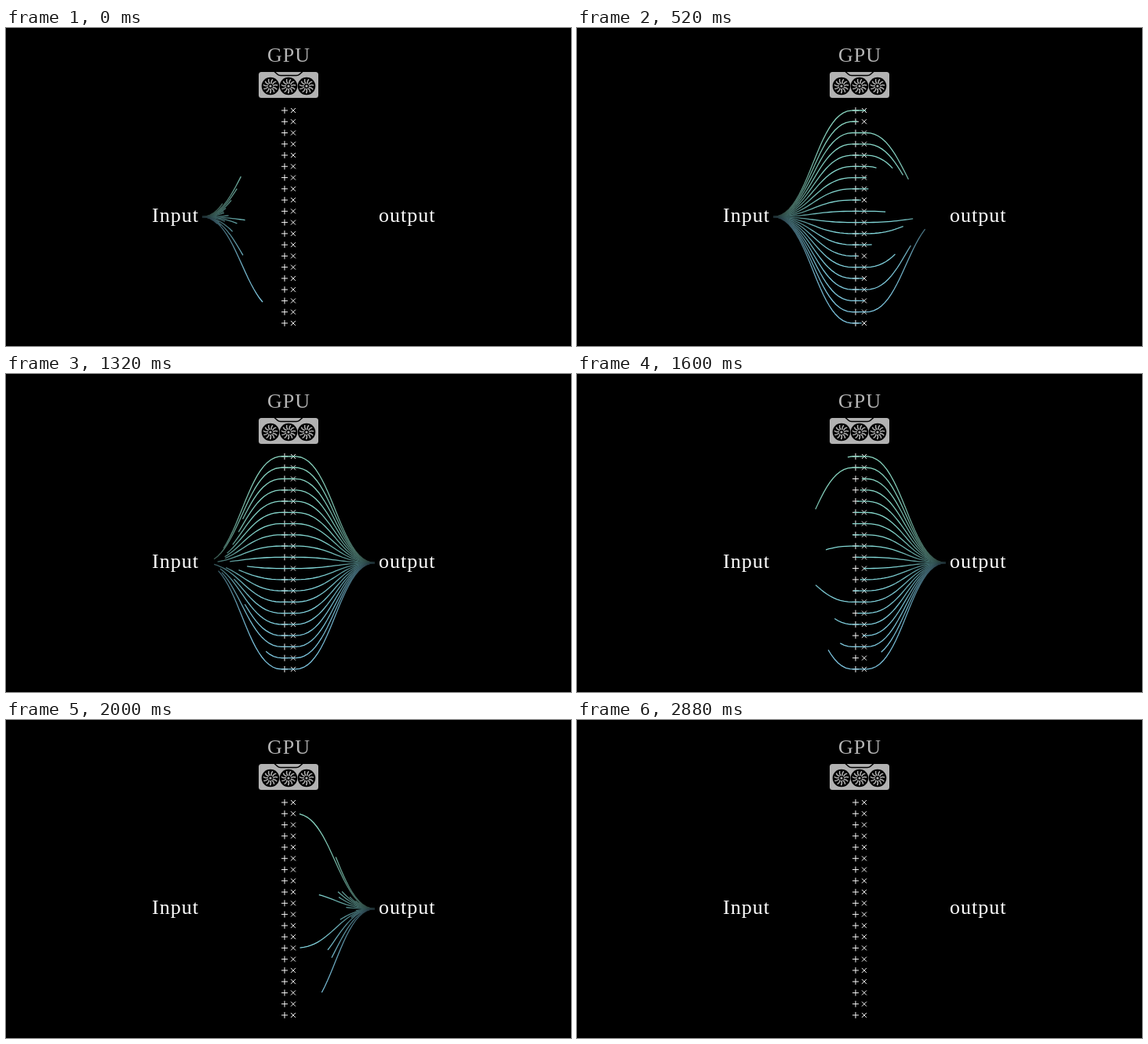
An HTML page for the animation above (3040 ms loop, 720 px wide and 405 px high).

```html
<!DOCTYPE html>
<html lang="en">
<head>
<meta charset="utf-8">
<title>GPU data flow</title>
<style>
  html, body { margin: 0; width: 100%; height: 100%; overflow: hidden; background: #000; }
  svg { display: block; width: 100%; height: 100%; }
  text { font: 26px "Liberation Serif", serif; letter-spacing: 1px; fill: #fff; }
</style>
</head>
<body>
<svg viewBox="0 0 720 405">
  <defs>
    <linearGradient id="fade" gradientUnits="userSpaceOnUse" x1="250" y1="0" x2="470" y2="0">
      <stop offset="0" stop-color="#fff" stop-opacity=".2"/>
      <stop offset=".23" stop-color="#fff" stop-opacity=".85"/>
      <stop offset=".34" stop-color="#fff"/>
      <stop offset=".66" stop-color="#fff"/>
      <stop offset=".77" stop-color="#fff" stop-opacity=".85"/>
      <stop offset="1" stop-color="#fff" stop-opacity=".2"/>
    </linearGradient>
    <mask id="taper" maskUnits="userSpaceOnUse" x="240" y="95" width="240" height="290">
      <rect x="240" y="95" width="240" height="290" fill="url(#fade)"/>
    </mask>
  </defs>
  <text x="333" y="43" style="fill:#b5b5b5">GPU</text>
  <text x="186" y="247">Input</text>
  <text x="475" y="246.5">output</text>
  <g id="card">
    <rect x="322" y="56" width="76" height="33" rx="3.5" fill="#b2b2b2"/>
    <path d="M342 55.5L346 59Q347.5 60.5 350 60.5H370Q372.5 60.5 374 59L378 55.5" fill="none" stroke="#000" stroke-width="1.6"/>
  </g>
  <path id="signs" fill="none" stroke="#fff" stroke-width=".95"/>
  <g id="wires" fill="none" stroke-width="1.3" mask="url(#taper)"></g>
</svg>
<script>
const LOOP = 3040, LAG = 1310, ROWS = 20;
const LEFT = 250, RIGHT = 470, FLAT_L = 351, FLAT_R = 369, MID = 240.5;
const $ = id => document.getElementById(id);
const rowY = i => 105 + 14.26 * i;

function add(parent, tag, attrs) {
  const el = document.createElementNS("http://www.w3.org/2000/svg", tag);
  for (const k in attrs) el.setAttribute(k, attrs[k]);
  return parent.appendChild(el);
}

function drawFan(cx, cy) {
  const g = add($("card"), "g", { transform: `translate(${cx} ${cy})` });
  add(g, "circle", { r: 11.3, fill: "#000" });
  for (let k = 0; k < 11; k++) {
    add(g, "path", {
      d: "M3.2 0Q6 -2.4 9.2 -.8", fill: "none", stroke: "#b2b2b2",
      "stroke-width": 1.5, transform: `rotate(${k * 360 / 11})`
    });
  }
  add(g, "circle", { r: 1.6, fill: "#b2b2b2" });
}

function drawSigns() {
  let d = "";
  for (let i = 0; i < ROWS; i++) {
    const y = rowY(i);
    d += `M351 ${y}h8M355 ${y - 4}v8M363 ${y - 3}l6 6M363 ${y + 3}l6 -6`;
  }
  $("signs").setAttribute("d", d);
}

function wireColor(i) {
  const f = i / (ROWS - 1);
  return `hsl(${163 + 34 * f} ${46 + 14 * f}% 68%)`;
}

// Overlaid waves scatter the moments at which the wires are half drawn
function wireTiming(i) {
  const wave = (deg, phase) => Math.cos((deg * i + phase) * Math.PI / 180);
  const half = 373 + 94 * wave(54, -12) + 76 * wave(162, 131)
    + 64 * wave(90, -36) - 48 * wave(180, 0);
  const span = 1410 + .7 * half; // late wires are also slower
  return { start: half - span / 2, span };
}

// Logistic ease-in-out, rescaled to run exactly from 0 to 1
const sigma = x => 1 / (1 + Math.exp(-x));
function ease(t) {
  t = Math.min(1, Math.max(0, t));
  const e = sigma(-5);
  return (sigma(10 * (t - .5)) - e) / (1 - 2 * e);
}

// S-curve: a cubic Bezier with horizontal handles
const curveX = u => 3 * u * (1 - u) * (.46 * (1 - u) + .54 * u) + u * u * u;
const curveY = u => u * u * (3 - 2 * u);

// A wire has three equal parts in p: fan out, straight, fan in (mirrored)
function wirePoint(p, y) {
  if (p > 1 && p < 2) return [FLAT_L + (FLAT_R - FLAT_L) * (p - 1), y];
  const u = p <= 1 ? p : 3 - p;
  const dx = (FLAT_L - LEFT) * (p <= 1 ? curveX(u) : 1 - curveX(1 - u));
  return [p <= 1 ? LEFT + dx : RIGHT - dx, MID + (y - MID) * curveY(u)];
}

function wirePath(from, to, y) {
  if (to - from < 1e-4) return "";
  const n = Math.ceil((to - from) * 24), pts = [];
  for (let k = 0; k <= n; k++) {
    const [px, py] = wirePoint(from + (to - from) * k / n, y);
    pts.push(px.toFixed(2) + " " + py.toFixed(2));
  }
  return "M" + pts.join("L");
}

[337, 360, 383].forEach(x => drawFan(x, 74));
drawSigns();
const wires = Array.from({ length: ROWS }, (_, i) => ({
  y: rowY(i),
  ...wireTiming(i),
  el: add($("wires"), "path", { stroke: wireColor(i) })
}));

function render(t) {
  for (const { y, start, span, el } of wires) {
    const head = 3 * ease((t - start) / span);
    const tail = 3 * ease((t - start - LAG) / span);
    el.setAttribute("d", wirePath(tail, head, y));
  }
}

const t0 = performance.now();
function tick() {
  render((performance.now() - t0) % LOOP);
  requestAnimationFrame(tick);
}
render(0);
requestAnimationFrame(tick);
</script>
</body>
</html>
```
